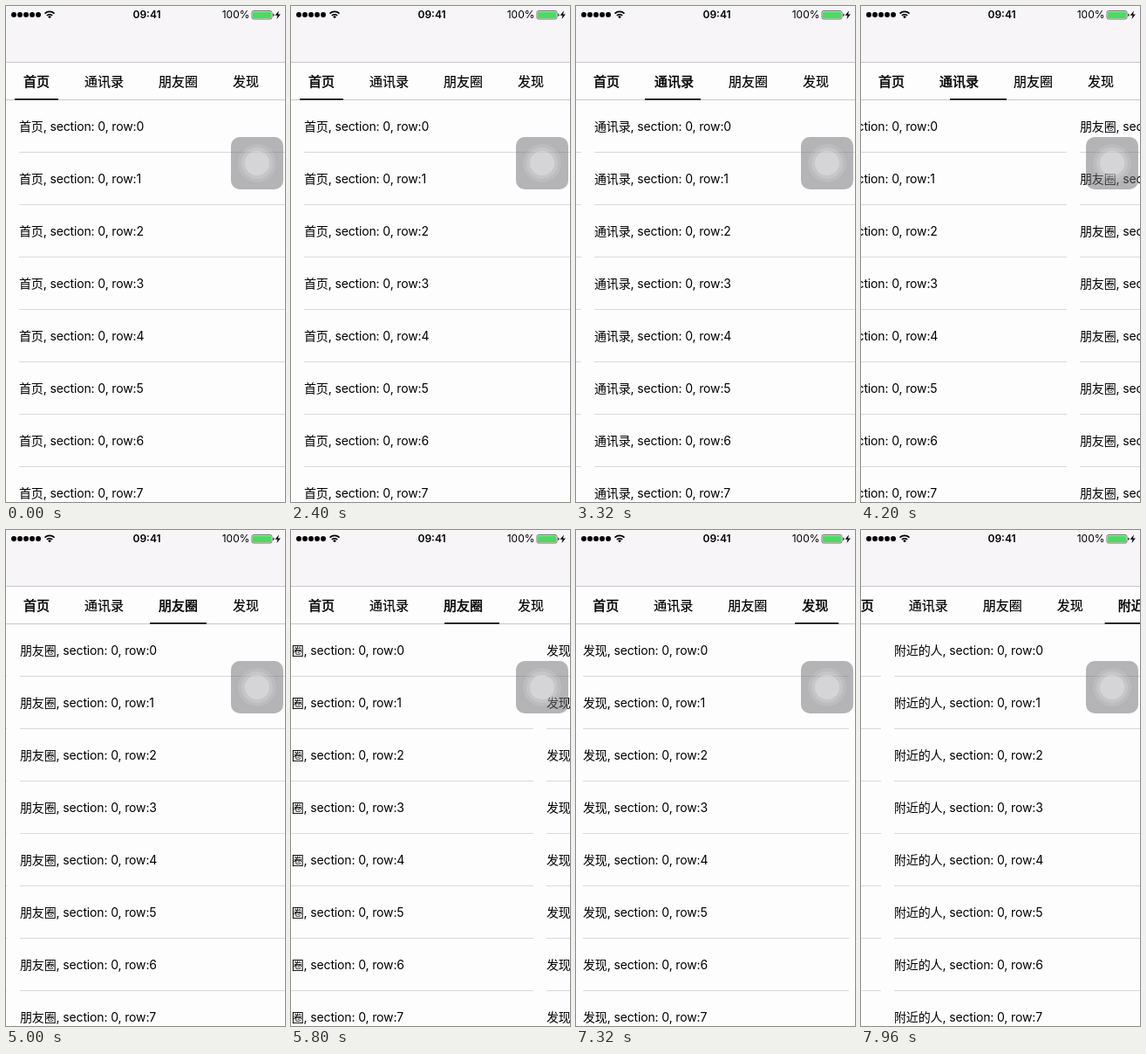
An HTML page that plays this animation: 320 px wide and 568 px high, repeating every 8 s.

```html
<!DOCTYPE html>
<html lang="zh-CN">
<head>
<meta charset="utf-8">
<style>
html, body { margin: 0; width: 100%; height: 100%; overflow: hidden; background: #fdfdfd; }
body { position: relative; color: #000; font: 14px Inter, "Noto Sans CJK SC", "Noto Sans CJK", sans-serif; white-space: nowrap; }
div, svg, span { position: absolute; }
#nav { width: 320px; height: 64px; background: #f7f5f8; border-bottom: 1px solid #c8c7cc; }
#nav span { top: 0; font-size: 12px; line-height: 20px; }
#tabs { top: 65px; width: 320px; height: 43px; overflow: hidden; background: #fdfdfd; box-shadow: inset 0 -1px #c8c7cc; }
#tabs span { top: 0; line-height: 43px; font-size: 15px; -webkit-text-stroke: .2px; }
#tabs .on { -webkit-text-stroke: .5px; }
#bar { top: 41px; height: 1px; background: #000; border-bottom: 1px solid #555; }
#list { top: 108px; width: 320px; height: 460px; overflow: hidden; }
.page { top: 0; width: 320px; }
.row { left: 15px; width: 305px; height: 59px; line-height: 60px; letter-spacing: -.01em; border-bottom: 1px solid #d9d8dc; }
</style>
</head>
<body>
<div id="nav">
  <svg width="320" height="20">
    <path d="M9 10h28.1" stroke="#000" stroke-width="6" stroke-linecap="round" stroke-dasharray="0 7"/>
    <g fill="none" stroke="#000" stroke-width="1.7">
      <path d="M44.5 8.6a8 8 0 0 1 11 0M46.8 11a4.7 4.7 0 0 1 6.4 0"/>
    </g>
    <path d="M50 14.2l-1.9-2a2.7 2.7 0 0 1 3.8 0z"/>
    <rect x="282" y="5.5" width="23" height="9.5" rx="2" fill="none" stroke="#555" stroke-width=".8"/>
    <rect x="283" y="6.5" width="21" height="7.5" rx="1" fill="#4cd964"/>
    <path d="M306 8.5a1.7 1.7 0 0 1 0 3.5z" fill="#555"/>
    <path d="M313 5.5l-4.4 5.3h2.9l-1 4.2 4.4-5.6h-2.9z"/>
  </svg>
  <span style="left:145.5px;font-weight:600">09:41</span>
  <span style="right:40.5px">100%</span>
</div>
<div id="tabs"><div id="strip"><div id="bar"></div></div></div>
<div id="list"><div id="pages"></div></div>
<svg style="left:258px;top:150px" width="60" height="60">
  <rect width="60" height="60" rx="10" fill="#6c6a70" fill-opacity=".5"/>
  <g fill="#fff">
    <circle cx="30" cy="30" r="22" fill-opacity=".1"/>
    <circle cx="30" cy="30" r="18" fill-opacity=".14"/>
    <circle cx="30" cy="30" r="14" fill-opacity=".27"/>
  </g>
</svg>
<script>
const LOOP = 8000, WIDTH = 320, TAU = 168;
const names = ['首页', '通讯录', '朋友圈', '发现', '附近的人'];
// start, length of the finger drag, moment of rest (ms)
const swipes = [[2400, 380, 3520], [4080, 122, 5080], [5600, 410, 6680], [7240, 410, 8360]];
const $ = id => document.getElementById(id);

function add(parent, tag, left, text = '', cls = '') {
  const el = document.createElement(tag);
  el.style.left = left + 'px';
  el.textContent = text;
  el.className = cls;
  return parent.appendChild(el);
}

let x = 20;
const tabs = names.map((name, i) => {
  const left = x, width = name.length * 15;
  x += width + 40;
  const page = add($('pages'), 'div', i * WIDTH, '', 'page');
  for (let r = 0; r < 8; r++) {
    const row = add(page, 'div', 15, `${name}, section: 0, row:${r}`, 'row');
    row.style.top = r * 60 + 'px';
  }
  return { left: left - 10, width: width + 20, el: add($('strip'), 'span', left, name) };
});

// Accelerating drag, then exponential braking at the same speed
function progress(t, [start, drag, end]) {
  if (t <= start) return 0;
  if (t >= end) return 1;
  const s = t - start, reach = drag / (drag + 2 * TAU);
  if (s < drag) return reach * (s / drag) ** 2;
  const c = s - drag, rest = c / (end - start - drag);
  return 1 - (1 - reach) * Math.exp(-c / TAU) * (1 - rest ** 12);
}

function draw(now) {
  const t = now % LOOP;
  const parts = swipes.map(s => progress(t, s));
  const pos = parts.reduce((a, b) => a + b);
  const i = Math.min(Math.floor(pos), names.length - 2), f = pos - i;
  const mix = key => tabs[i][key] + (tabs[i + 1][key] - tabs[i][key]) * f;
  $('pages').style.transform = `translateX(${-Math.round(pos * WIDTH)}px)`;
  $('strip').style.transform = `translateX(${-38 * parts[3]}px)`;
  $('bar').style.left = mix('left') + 'px';
  $('bar').style.width = mix('width') + 'px';
  // The first tab keeps its heavy face
  tabs.forEach((tab, k) => tab.el.className = k === 0 || k === Math.round(pos) ? 'on' : '');
  requestAnimationFrame(draw);
}
requestAnimationFrame(draw);
</script>
</body>
</html>
```
